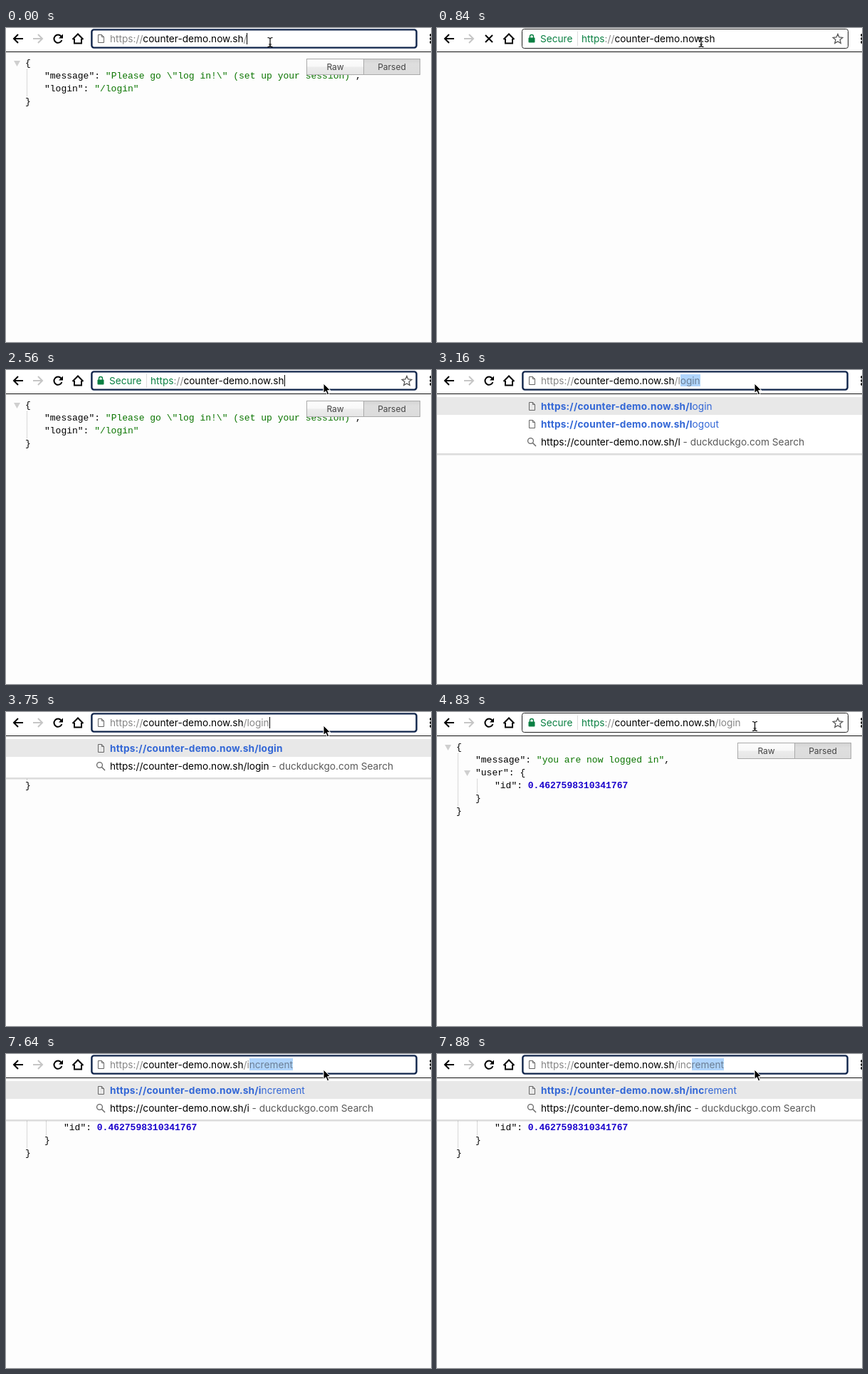
An HTML page for the animation above (8000 ms loop, 597 by 441 pixels).

```html
<!DOCTYPE html>
<html lang="en">
<head>
<meta charset="utf-8">
<title>Session demo</title>
<style>
html, body { margin: 0; width: 100%; height: 100%; overflow: hidden; }
body { position: relative; background: #fdfdfd; font: 13.66px/18px Inter, "Open Sans", sans-serif; color: #000; }
div, svg { position: absolute; white-space: pre; }
svg { left: 0; top: 0; fill: none; }
#view, #page { left: 0; top: 0; width: 597px; height: 441px; }
.tools { left: 0; top: 0; width: 597px; height: 33px; background: #fff; border-bottom: 1px solid #111; }
.url { top: 6px; }
.grey { color: #868686; }
.green { color: #0b8043; }
.sel { background: #b0d5fd; padding-top: 1px; }
.grey.sel { color: #6c7f94; }
.caret { display: inline-block; width: 1px; height: 16px; margin-right: -1px; background: #000; vertical-align: -3px; }
.drop { left: 0; top: 34px; width: 597px; padding: 4px 0; background: #fff; border-bottom: 2px solid #dcdcdc; box-shadow: 0 1px 1px #0001; }
.row { position: relative; height: 25px; line-height: 26px; padding-left: 146px; color: #3367d6; }
.row:first-child { background: #e8e8e8; }
.row b { letter-spacing: .2px; }
.ask { color: #000; }
.ask i { font-style: normal; color: #5a5a5a; }
.json { font: 13px/18px "Liberation Mono", monospace; }
.str { color: #0b7500; }
.num { color: #1a01cc; font-weight: bold; }
.dots { width: 0; border-left: 1px dotted #b4b4b4; }
.btn { top: 43px; width: 81px; height: 23px; box-sizing: border-box; border: 1px solid #aaa; font-size: 12px; line-height: 22px; text-align: center; color: #444; background: linear-gradient(#fdfdfd, #f8f8f8 48%, #ececec 52%, #e6e6e6); }
.on { background: linear-gradient(#d4d4d4, #dedede 30%, #dcdcdc); }
</style>
</head>
<body>
<div id="page"></div>
<div id="view"></div>
<svg id="mouse" width="597" height="441"></svg>
<script>
const LOOP = 8000, HOST = 'counter-demo.now.sh', BASE = 'https://' + HOST + '/';
const $ = id => document.getElementById(id);
const svg = (body, w = 597, h = 34) => `<svg width="${w}" height="${h}">${body}</svg>`;
const stroke = (d, color = '#000', w = 2) => `<path d="${d}" stroke="${color}" stroke-width="${w}"/>`;
const frame = (inset, color, w) => `<rect x="${119 + inset}" y="${1 + inset}" width="${459 - 2 * inset}" height="${28 - 2 * inset}" rx="3" fill="#fff" stroke="${color}" stroke-width="${w}"/>`;

const docIcon = stroke('M129.5 9.5h5l3 3v8h-8zM134.5 9.5v3h3', '#666', 1);
const lens = '<circle cx="131.5" cy="11.5" r="3.9" stroke="#666" stroke-width="1.3"/>' + stroke('M134.3 14.3L139 19', '#666', 1.5);
const lock = '<rect x="128.5" y="13.5" width="9" height="7" rx="1" fill="#0b8043"/>' + stroke('M130.5 14v-2a2.5 2.5 0 0 1 5 0v2', '#0b8043', 1.4);
const star = stroke('M563 8.5l1.9 4.5 4.9.4-3.7 3.2 1.1 4.8-4.2-2.5-4.2 2.5 1.1-4.8-3.7-3.2 4.9-.4z', '#555', 1.3);
const reload = stroke('M77.4 11.6A5.6 5.6 0 1 0 78.4 17') + '<path d="M80 8.5v6h-6z" fill="#000"/>';
const stop = stroke('M68 10l10 10M78 10L68 20');
const nav = stroke('M24 15H11M17 9l-6 6 6 6') + stroke('M38 15h13M45 9l6 6-6 6', '#c6c6c6')
  + stroke('M93.5 16l7.5-7.5 7.5 7.5M96 15v6.5h10V15')
  + [10, 15, 20].map(y => `<circle cx="597" cy="${y}" r="1.9" fill="#000"/>`).join('');

// Page contents
const line = (n, depth, html) => `<div class="json" style="left:${27 * depth + 27}px;top:${41 + 18 * n}px">${html}</div>`;
const dots = (x, y, h) => `<div class="dots" style="left:${x}px;top:${y}px;height:${h}px"></div>`;
const fold = (x, y) => `<path d="M${x} ${y}h9l-4.5 8z" fill="#cfcfcf"/>`;
const str = s => `<span class="str">"${s}"</span>`;
const buttons = '<div class="btn" style="left:422px">Raw</div><div class="btn on" style="left:502px;width:80px">Parsed</div>';
const pages = {
  blank: '',
  home: svg(fold(11, 46), 597, 120) + dots(29, 58, 37) + line(0, 0, '{')
    + line(1, 1, `"message": ${str('Please go \\"log in!\\" (set up your session)')},`)
    + line(2, 1, `"login": ${str('/login')}`) + line(3, 0, '}') + buttons,
  user: svg(fold(11, 46) + fold(38, 82), 597, 120) + dots(29, 58, 73) + dots(56, 94, 19) + line(0, 0, '{')
    + line(1, 1, `"message": ${str('you are now logged in')},`) + line(2, 1, '"user": {')
    + line(3, 2, '"id": <span class="num">0.4627598310341767</span>')
    + line(4, 1, '}') + line(5, 0, '}') + buttons
};

// Browser states: each step changes only the listed fields
const typed = (path, rest, ...hits) => ({ focus: 1, secure: 0, sel: 0, caret: !rest, path: '/' + path, rest, hits, typed: path });
const loading = path => ({ focus: 0, caret: 0, busy: 1, secure: 0, path, rest: '', hits: [] });
const steps = [
  [0, { ...typed('', ''), page: 'home', busy: 0 }],
  [180, loading('')],
  [480, { secure: 1 }],
  [840, { page: 'blank' }],
  [910, { page: 'home', busy: 0 }],
  [1540, { focus: 1, sel: 1 }],
  [2560, { sel: 0, caret: 1 }],
  [2920, typed('', '', '', 'login', 'logout', 'increment')],
  [3160, typed('l', 'ogin', 'login', 'logout')],
  [3400, typed('lo', 'gin', 'login', 'logout')],
  [3540, typed('log', 'in', 'login', 'logout')],
  [3610, typed('logi', 'n', 'login')],
  [3750, typed('login', '', 'login')],
  [4290, loading('/login')],
  [4590, { secure: 1, page: 'blank' }],
  [4660, { page: 'user', busy: 0 }],
  [6450, { focus: 1, sel: 1 }],
  [6690, { sel: 0, caret: 1 }],
  [7100, { path: '/' }],
  [7640, typed('i', 'ncrement', 'increment')],
  [7760, typed('in', 'crement', 'increment')],
  [7880, typed('inc', 'rement', 'increment')]
];

function dropdown(s) {
  if (!s.hits.length) return '';
  const n = s.typed.length;
  const rows = s.hits.map(h => `<div class="row">${svg(`<g transform="translate(0 -2)">${docIcon}</g>`, 146, 25)}<b>${BASE}${h.slice(0, n)}</b>${h.slice(n)}</div>`);
  rows.push(`<div class="row ask">${svg(lens, 146, 25)}${BASE}${s.typed}<i> - duckduckgo.com Search</i></div>`);
  return `<div class="drop">${rows.join('')}</div>`;
}

function browser(s) {
  const scheme = s.secure ? '<span class="green">https</span><span class="grey">://</span>' : '<span class="grey">https://</span>';
  const url = `<span class="${s.sel ? 'sel' : ''}">${scheme}${HOST}<span class="grey">${s.path}</span></span>`
    + (s.caret ? '<span class="caret"></span>' : '') + `<span class="grey sel">${s.rest}</span>`;
  const badge = s.secure ? lock + stroke('M197.5 5v20', '#ddd', 1) : docIcon;
  const bar = s.focus ? frame(1.4, '#10254b', 2.4) : frame(.5, '#222', 1);
  return '<div class="tools"></div>'
    + svg(bar + nav + (s.busy ? stop : reload) + badge + (s.secure || !s.focus ? star : ''))
    + (s.secure ? '<div class="url green" style="left:145px">Secure</div>' : '')
    + `<div class="url" style="left:${s.secure ? 203 : 146}px">${url}</div>` + dropdown(s);
}

// Pointer keys: time, x, y, arrow (1) or text beam (0)
const keys = [
  [0, 371, 20, 0], [840, 371, 20, 0], [1360, 432, 23, 0], [1540, 432, 21, 1],
  [1900, 434, 21, 0], [2080, 446.5, 20, 0], [2560, 446, 19, 1],
  [4590, 446.5, 20, 0], [5970, 446.5, 20, 0], [6090, 446.5, 23, 0], [6450, 446, 22, 1]
];
const arrow = '<path d="M0 0V13.5L3.2 10.6L5.4 15.8L7.8 14.8L5.6 9.7H9.8Z" fill="#000" stroke="#fff"/>';
const beam = stroke('M-3.5-6.5Q0-6.5 0-4.5V4.5Q0 6.5-3.5 6.5M3.5-6.5Q0-6.5 0-4.5M0 4.5Q0 6.5 3.5 6.5M-2 3h4', '#000', 1.2);

function pointer(t) {
  const i = keys.findLastIndex(k => k[0] <= t);
  const a = keys[i], b = keys[i + 1];
  const p = b && a[3] === b[3] ? (t - a[0]) / (b[0] - a[0]) : 0;
  const at = n => p ? a[n] + (b[n] - a[n]) * p : a[n];
  return `<g transform="translate(${at(1)} ${at(2)})">${a[3] ? arrow : beam}</g>`;
}

let shown = -1;
function draw() {
  const t = performance.now() % LOOP;
  const now = steps.findLastIndex(s => s[0] <= t);
  if (now !== shown) {
    const state = Object.assign({}, ...steps.slice(0, now + 1).map(s => s[1]));
    $('page').innerHTML = pages[state.page];
    $('view').innerHTML = browser(state);
    shown = now;
  }
  $('mouse').innerHTML = pointer(t);
  requestAnimationFrame(draw);
}
draw();
</script>
</body>
</html>
```
